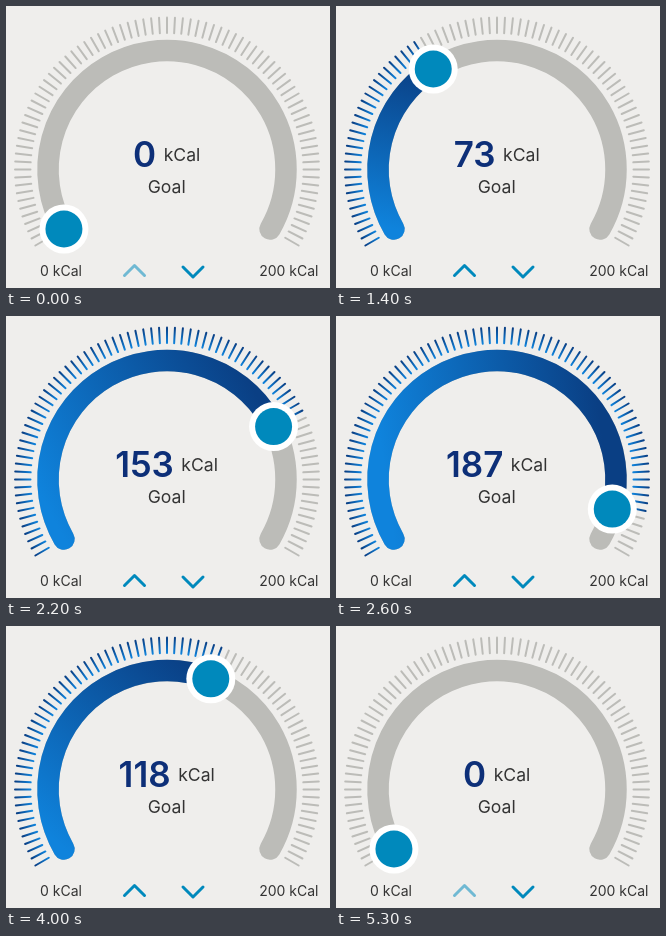
An HTML page with a canvas that plays this animation: 324 by 282 pixels, repeating every 8 s.

```html
<!DOCTYPE html>
<html lang="en">
<head>
<meta charset="utf-8">
<title>Calorie goal dial</title>
<style>
  html, body { margin: 0; width: 100%; height: 100%; overflow: hidden; background: #efeeec; }
  canvas, svg { position: absolute; left: 0; top: 0; width: 324px; height: 282px; }
  text { font-family: Inter, Roboto, sans-serif; fill: #333; }
  .mid { text-anchor: middle; font-size: 17.6px; }
  .small { font-size: 14px; }
  #num { font-size: 35px; font-weight: 600; fill: #0d2f78; }
</style>
</head>
<body>
<canvas></canvas>
<svg viewBox="0 0 324 282">
  <text class="mid" x="160.7" y="161"><tspan id="num">0</tspan><tspan dx="7.5" dy="-6">kCal</tspan></text>
  <text class="mid" x="160.7" y="187">Goal</text>
  <text class="small" x="34" y="270">0 kCal</text>
  <text class="small" x="312.5" y="270" text-anchor="end">200 kCal</text>
</svg>
<script>
const LOOP = 8000, STEP = 100, MAX = 200;
const CX = 161, CY = 163.5, R = 119, START = 150, SWEEP = 240;
const GREY = '#bcbcb8', BLUE = '#0089bc', LIGHT = '#0f83dc', DARK = '#0a3f84';

// [time, value] points of the drag
const drag = [
  [900, 0], [1000, 6], [1100, 18], [1300, 54], [1500, 91], [1600, 107], [1700, 118], [1800, 122],
  [1900, 125], [2100, 143], [2400, 172], [2600, 187], [2700, 194], [2800, 198], [2900, 200],
  [3300, 200], [3400, 196], [3500, 190], [3600, 181], [3800, 153], [4200, 82],
  [4500, 34], [4700, 13], [4900, 2], [5000, 0]
];

const canvas = document.querySelector('canvas');
const num = document.getElementById('num');
const ctx = canvas.getContext('2d');
const scale = window.devicePixelRatio || 1;
canvas.width = 324 * scale;
canvas.height = 282 * scale;

const rad = deg => deg * Math.PI / 180;
const polar = (deg, r) => [CX + r * Math.cos(rad(deg)), CY + r * Math.sin(rad(deg))];
const clamp = x => Math.max(0, Math.min(1, x));

function valueAt(t) {
  const i = drag.findIndex(p => p[0] >= t);
  if (i <= 0) return 0;
  const [t0, v0] = drag[i - 1], [t1, v1] = drag[i];
  return v0 + (v1 - v0) * (t - t0) / (t1 - t0);
}

// Opacity of a chevron that is dimmed between two times
const dimmed = (t, from, to) =>
  1 - 0.47 * clamp((t - from) / 200) * (1 - clamp((t - to) / 300));

function gradient([x0, y0], [x1, y1]) {
  const g = ctx.createLinearGradient(x0, y0, x1, y1);
  g.addColorStop(0, LIGHT);
  g.addColorStop(1, DARK);
  return g;
}

function line(points, color, width) {
  ctx.strokeStyle = color;
  ctx.lineWidth = width;
  ctx.beginPath();
  points.forEach(p => ctx.lineTo(...p));
  ctx.stroke();
}

function arc(end, color) {
  ctx.strokeStyle = color;
  ctx.lineWidth = 21.5;
  ctx.beginPath();
  ctx.arc(CX, CY, R, rad(START), rad(end));
  ctx.stroke();
}

function disc([x, y], r, color) {
  ctx.fillStyle = color;
  ctx.beginPath();
  ctx.arc(x, y, r, 0, 2 * Math.PI);
  ctx.fill();
}

function chevron(x, y, h, alpha) {
  ctx.globalAlpha = alpha;
  line([[x - 10, y + h], [x, y - h], [x + 10, y + h]], BLUE, 3);
  ctx.globalAlpha = 1;
}

function draw(t) {
  const value = Math.round(valueAt(t));
  const head = START + SWEEP * value / MAX;
  const knob = polar(head, R);

  ctx.setTransform(scale, 0, 0, scale, 0, 0);
  ctx.fillStyle = '#efeeec';
  ctx.fillRect(0, 0, 324, 282);
  ctx.lineCap = ctx.lineJoin = 'round';

  for (let a = START; a <= START + SWEEP; a += 3) {
    const inner = polar(a, 136.5), outer = polar(a, 152);
    const lit = value > 0 && a <= head;
    line([inner, outer], lit ? gradient(inner, outer) : GREY, 2);
  }

  arc(START + SWEEP, GREY);
  if (value > 0) arc(head, gradient(polar(START, R), knob));
  disc(knob, 24.5, '#fff');
  disc(knob, 18.5, BLUE);

  const rising = t < 2000;
  chevron(128.5, 264.5, 5, rising ? dimmed(t, -300, 1000) : dimmed(t, 5000, LOOP));
  chevron(187, 266, -5, dimmed(t, 2900, 3350));
  num.textContent = value;
}

function frame() {
  const t = performance.now() % LOOP;
  draw(Math.floor(t / STEP) * STEP);
  requestAnimationFrame(frame);
}
frame();
</script>
</body>
</html>
```
